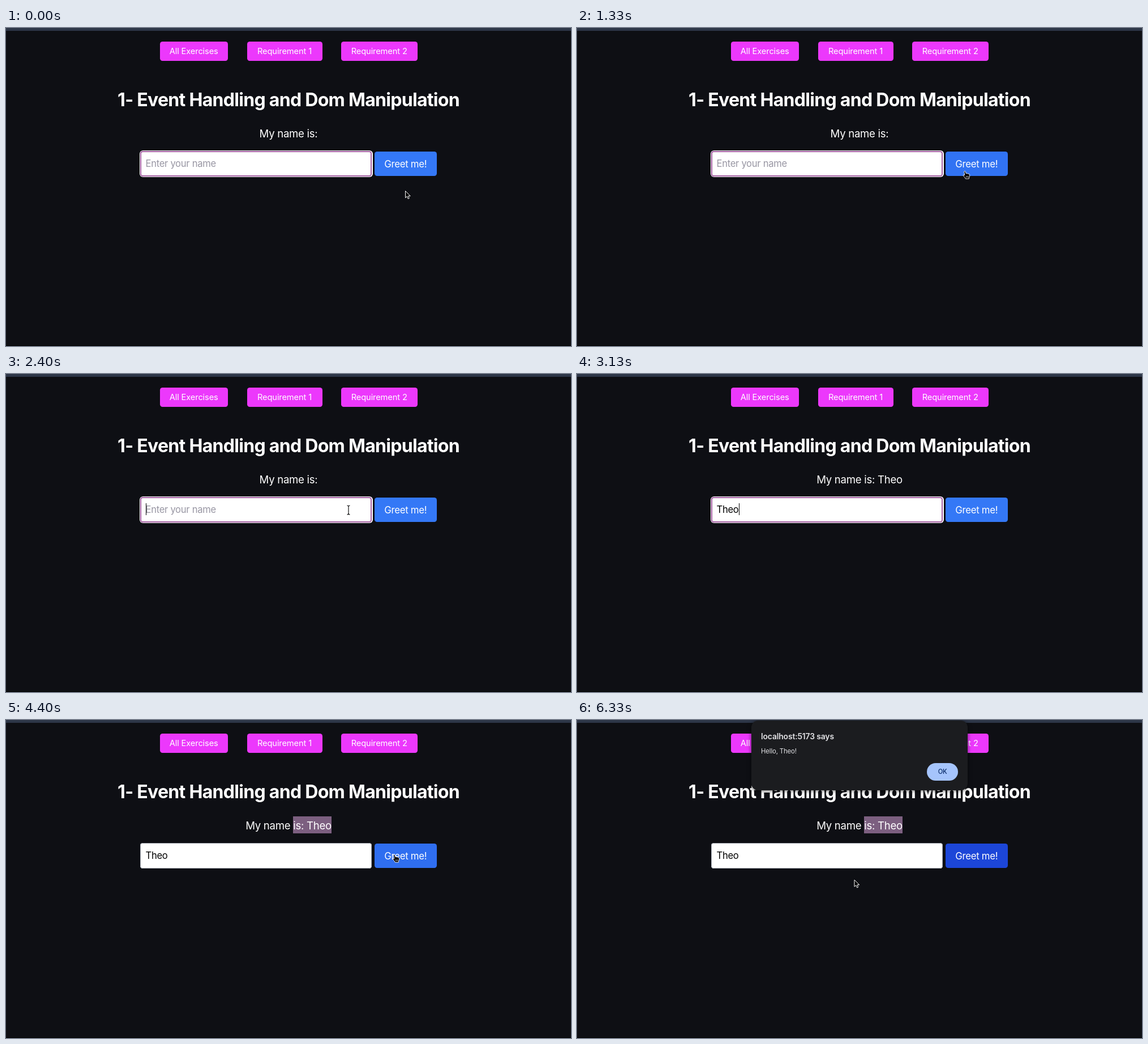
An HTML page for the animation above (6.93 s loop, 998 by 561 pixels).

```html
<!DOCTYPE html>
<html lang="en">
<head>
<meta charset="utf-8">
<title>Event Handling and Dom Manipulation</title>
<style>
  html, body { margin: 0; width: 100%; height: 100%; overflow: hidden; background: #0e0f14; }
  #stage {
    position: relative; width: 998px; height: 561px; overflow: hidden;
    color: #fff; background: #0e0f14;
    font-family: Inter, Roboto, sans-serif; font-optical-sizing: none;
    letter-spacing: -.018em; white-space: nowrap;
  }
  #stage > *, #dialog > * { position: absolute; box-sizing: border-box; margin: 0; }
  .bar { left: 0; top: 0; width: 100%; height: 4.5px; background: #2d3648; }
  .edge { left: 0; top: 560px; width: 100%; height: 1px; background: #000; }
  .nav {
    top: 23.5px; height: 34.5px; border-radius: 4.5px; background: #ec38fc;
    font-size: 14.7px; line-height: 35px; letter-spacing: -.01em; text-align: center;
  }
  h1 { top: 106px; width: 100%; font-size: 32.1px; line-height: 42px; letter-spacing: -.023em; text-align: center; }
  #greeting { top: 170.5px; width: 100%; font-size: 18.6px; line-height: 30px; text-align: center; }
  #selected { background: #7c5f80; padding: 4.5px 0 3px; }
  #ring {
    left: 235.5px; top: 215.5px; width: 412px; height: 47.5px;
    border-radius: 6px; background: #fff; will-change: opacity;
  }
  #field {
    left: 237px; top: 217px; width: 409px; height: 44.5px; padding-left: 9.5px;
    border-radius: 4.5px; background: #fff; box-shadow: inset 0 0 0 1px #a5a9b2;
    font-size: 16.6px; line-height: 45.5px;
  }
  #field.focus { box-shadow: inset 0 0 0 2px #a45fa2; }
  #typed { color: #000; }
  #placeholder { color: #9896a3; }
  #caret { display: inline-block; width: 1px; height: 21px; margin-right: -1px; background: #000; vertical-align: -4px; }
  #greet {
    left: 650.5px; top: 218px; width: 110.5px; height: 43px; border-radius: 4.5px;
    font-size: 16.8px; line-height: 44px; text-align: center;
  }
  #dialog {
    left: 308px; top: 1px; width: 382px; height: 123px; border-radius: 12px;
    background: #1b1c1f; color: #e3e3e6; box-shadow: 0 1px 7px rgba(0, 0, 0, .6);
  }
  #dialog .title { left: 17px; top: 18px; font-size: 13.9px; line-height: 20px; font-weight: 600; letter-spacing: -.01em; }
  #dialog .message { left: 17px; top: 43.5px; font-size: 11.3px; line-height: 20px; letter-spacing: -.01em; }
  #dialog .ok {
    left: 310px; top: 75px; width: 55px; height: 30.5px; border-radius: 16px;
    background: #a5c4fc; color: #0a2c69; font-size: 11.2px; line-height: 31px;
    font-weight: 500; text-align: center;
  }
  #cursor { left: 0; top: 0; width: 24px; height: 24px; overflow: visible; }
</style>
</head>
<body>
<div id="stage">
  <div class="bar"></div>
  <div class="nav" style="left:271.5px;width:120.5px">All Exercises</div>
  <div class="nav" style="left:425.5px;width:133px">Requirement 1</div>
  <div class="nav" style="left:592px;width:134.5px">Requirement 2</div>
  <h1>1- Event Handling and Dom Manipulation</h1>
  <p id="greeting">My name <span id="selected"></span><span id="unselected"></span></p>
  <div id="ring"></div>
  <div id="field"><span id="typed"></span><span id="caret"></span><span id="placeholder">Enter your name</span></div>
  <div id="greet">Greet me!</div>
  <div id="dialog">
    <div class="title">localhost:5173 says</div>
    <div class="message">Hello, Theo!</div>
    <div class="ok">OK</div>
  </div>
  <svg id="cursor">
    <path id="arrow" d="M.5 .5V12.6L3.3 10 5.2 14.3 7.2 13.4 5.4 9.3H9.2Z" fill="#000" stroke="#fff"/>
    <g id="hand">
      <path d="M-1.2 1.2Q0-.4 1.2 1.2L2 4.6Q3.4 3.9 4.2 5 5.6 4.4 6.3 5.5 8.3 5 8.6 7.2 8.9 10 7.4 12.2V14H1.3Q.6 12-1.2 10.4L-3 7.8Q-2.6 6.4-.4 7.8Z"
            fill="#000" stroke="#fff" stroke-width=".9"/>
      <path d="M2.5 9V12M4.3 9V12M6.1 9V12" stroke="#fff" stroke-width=".6"/>
    </g>
    <g id="beam" fill="none">
      <path d="M-2.5-8Q0-8 0-6V6Q0 8-2.5 8M2.5-8Q0-8 0-6M0 6Q0 8 2.5 8" stroke="#fff" stroke-width="2.4"/>
      <path d="M-2.5-8Q0-8 0-6V6Q0 8-2.5 8M2.5-8Q0-8 0-6M0 6Q0 8 2.5 8" stroke="#000" stroke-width="1.1"/>
    </g>
  </svg>
  <div class="edge"></div>
</div>
<script>
const LOOP = 6930;
const NAME = "Theo";
const KEY_TIMES = [2800, 2930, 3070, 3130];
const BLUR_TIME = 3670, DRAG_END = 4000, DIALOG_TIME = 4600;
const WAKE_TIME = 3470; // pointer reappears after typing
const HOVERS = [[530, 850], [1320, 1800], [4380, LOOP + 1]];
const REST = [52, 120, 246], HOVER = [28, 70, 216];

// Pointer path: time, x, y
const PATH = [
  [270, 705, 287], [600, 702, 242], [780, 698, 250], [1000, 695, 277],
  [1070, 695, 277], [1330, 685, 252], [1530, 689, 243], [1610, 689, 243],
  [1800, 694, 272.5], [1950, 680, 266], [2330, 605, 240],
  [3400, 605, 240], [BLUR_TIME, 508, 186], [DRAG_END, 745, 203], [4130, 740, 205],
  [4400, 686, 237], [4870, 686, 237], [5070, 568, 164.5], [5300, 400, 80],
  [5430, 313, 46], [5600, 348, 51], [5950, 410, 150], [6330, 489.5, 281.5]
];

const el = {};
document.querySelectorAll("[id]").forEach(node => el[node.id] = node);

const ramp = (t, start, duration) => Math.min(1, Math.max(0, (t - start) / duration));
const show = (node, on) => node.style.display = on ? "" : "none";

function pointerAt(t) {
  const next = PATH.findIndex(key => key[0] > t);
  if (next === 0) return PATH[0].slice(1);
  if (next < 0) return PATH[PATH.length - 1].slice(1);
  const [t0, x0, y0] = PATH[next - 1], [t1, x1, y1] = PATH[next];
  const k = (t - t0) / (t1 - t0);
  return [x0 + (x1 - x0) * k, y0 + (y1 - y0) * k];
}

function pointerShape(t, x, y) {
  const within = (left, top, right, bottom) => x > left && x < right && y > top && y < bottom;
  if (t >= DIALOG_TIME) return "arrow";
  if (t >= BLUR_TIME && t < DRAG_END) return "beam";
  if (within(650, 218, 761, 261)) return "hand";
  return within(237, 217, 646, 261) || within(425, 171, 574, 201) ? "beam" : "arrow";
}

function drawText(t) {
  const typed = NAME.slice(0, KEY_TIMES.filter(time => t >= time).length);
  const tail = typed ? "is: " + typed : "is:";
  const count = Math.ceil(tail.length * ramp(t, BLUR_TIME, 110));
  el.selected.textContent = tail.slice(0, count);
  el.unselected.textContent = tail.slice(count);
  show(el.selected, count > 0);

  el.typed.textContent = typed;
  show(el.placeholder, !typed);
  const focused = t < BLUR_TIME;
  el.field.className = focused ? "focus" : "";
  el.ring.style.opacity = focused ? 1 : 0;

  const blinkOn = Math.floor((t - 130) / 325) % 2 === 0;
  const caretOn = typed ? t < WAKE_TIME : blinkOn;
  el.caret.style.visibility = caretOn ? "visible" : "hidden";
}

function drawPointer(t) {
  const [x, y] = pointerAt(t);
  const shape = pointerShape(t, x, y);
  for (const name of ["arrow", "hand", "beam"]) show(el[name], name === shape);
  el.cursor.style.transform = `translate(${x}px, ${y}px)`;
  show(el.cursor, t < KEY_TIMES[0] || t >= WAKE_TIME);
}

function draw(t) {
  drawText(t);
  drawPointer(t);
  const hover = HOVERS.reduce((sum, [from, to]) => sum + ramp(t, from, 100) - ramp(t, to, 100), 0);
  el.greet.style.background = `rgb(${REST.map((c, i) => c + (HOVER[i] - c) * hover)})`;
  el.dialog.style.opacity = ramp(t, DIALOG_TIME, 100);
}

const start = performance.now();
function tick() {
  draw((performance.now() - start) % LOOP);
  requestAnimationFrame(tick);
}
tick();
</script>
</body>
</html>
```
